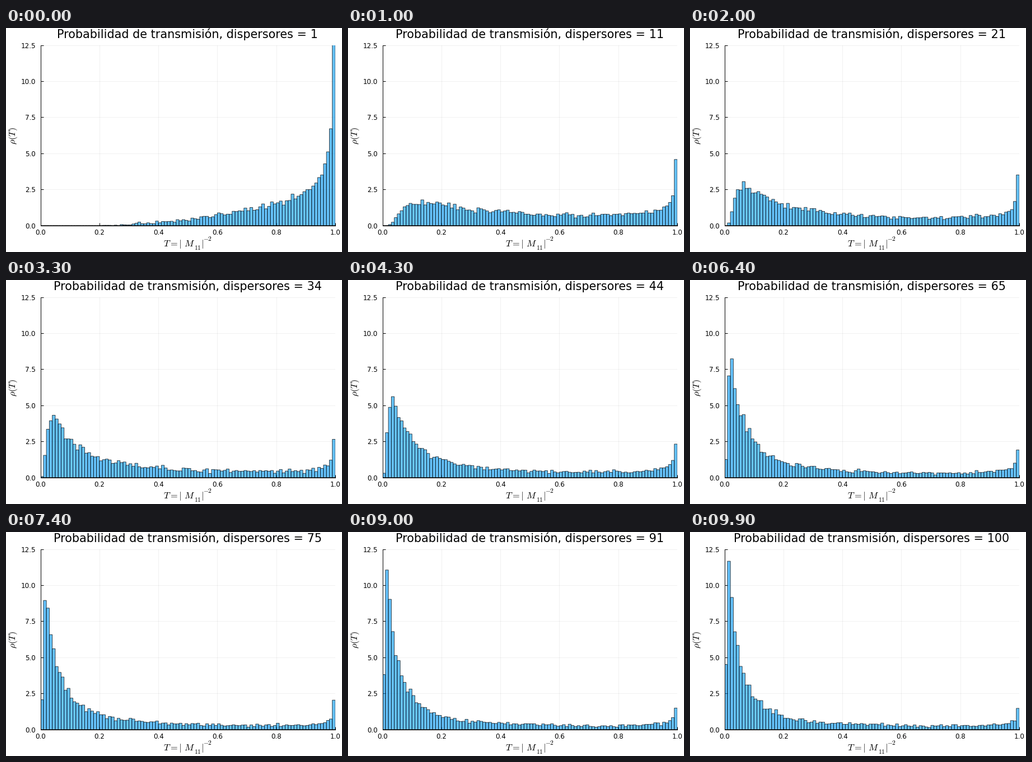
A matplotlib script for the animation above (10000 ms loop, 600 by 400 pixels).

```python
import numpy as np
import matplotlib.pyplot as plt
from matplotlib.animation import FuncAnimation

W, H, DPI = 600, 400, 100
PX = 72 / DPI                                   # points per pixel
LEFT, RIGHT, TOP, BOTTOM = 61.6, 588, 30.5, 352.5
STEPS, SAMPLES, BINS = 100, 10000, 100
SIGMA = 0.5                                     # spread of one scatterer's strength

plt.rcParams.update({
    "font.family": "DejaVu Sans",
    "mathtext.fontset": "cm",
    "axes.linewidth": PX,
})


def densities():
    """Histogram of T = 1 / (1 + S^2), S being the summed random strengths."""
    rng = np.random.default_rng(11)
    total = np.zeros(SAMPLES)
    rows = []
    for _ in range(STEPS):
        total += SIGMA * rng.standard_normal(SAMPLES)
        t = 1 / (1 + total ** 2)
        rows.append(np.histogram(t, BINS, (0, 1), density=True)[0])
    return rows


def label(x, y, text, size, ha="center", **kw):
    return fig.text(x / W, 1 - y / H, text, fontsize=size * PX,
                    ha=ha, va="baseline", **kw)


rho = densities()
fig = plt.figure(figsize=(W / DPI, H / DPI), dpi=DPI, facecolor="white")
ax = fig.add_axes([LEFT / W, 1 - BOTTOM / H,
                   (RIGHT - LEFT) / W, (BOTTOM - TOP) / H])
ax.set(xlim=(0, 1), ylim=(0, 12.5),
       xticks=np.linspace(0, 1, 6), yticks=np.linspace(0, 12.5, 6))
ax.xaxis.set_major_formatter("{x:.1f}")
ax.yaxis.set_major_formatter("{x:.1f}")
ax.set_axisbelow(True)
ax.grid(color="black", alpha=0.07, linewidth=0.8 * PX)
ax.tick_params(direction="in", length=5 * PX, width=PX, labelsize=11.9 * PX)
ax.tick_params(axis="x", pad=6.5 * PX)
ax.tick_params(axis="y", pad=8.5 * PX)
ax.spines[["top", "right"]].set_visible(False)

bars = ax.bar(np.arange(BINS) / BINS, rho[0], 1 / BINS, align="edge",
              facecolor=(0, 0.606, 0.979, 0.6), edgecolor=(0, 0, 0, 0.78),
              linewidth=0.9 * PX, snap=False)

title = label(324.3, 18, "", 20.8)
label(17, 192.5, r"$\rho(T)$", 16.3, rotation=90, rotation_mode="anchor")

# Axis label with deeper scripts than mathtext sets by itself
label(280.8, 390.5, r"$T = |\ M$", 16.3, "left")
label(336.3, 395.5, "$11$", 11.4, "left")
label(347.8, 390.5, "$|$", 16.3, "left")
label(352.4, 380.5, "$-2$", 11.4, "left")


def draw(i):
    for bar, height in zip(bars, rho[i]):
        bar.set_height(height)
    title.set_text(f"Probabilidad de transmisión, dispersores = {i + 1}")
    return [*bars, title]


anim = FuncAnimation(fig, draw, frames=STEPS, interval=100,
                     repeat=True, repeat_delay=0, blit=False)
plt.show()
```
